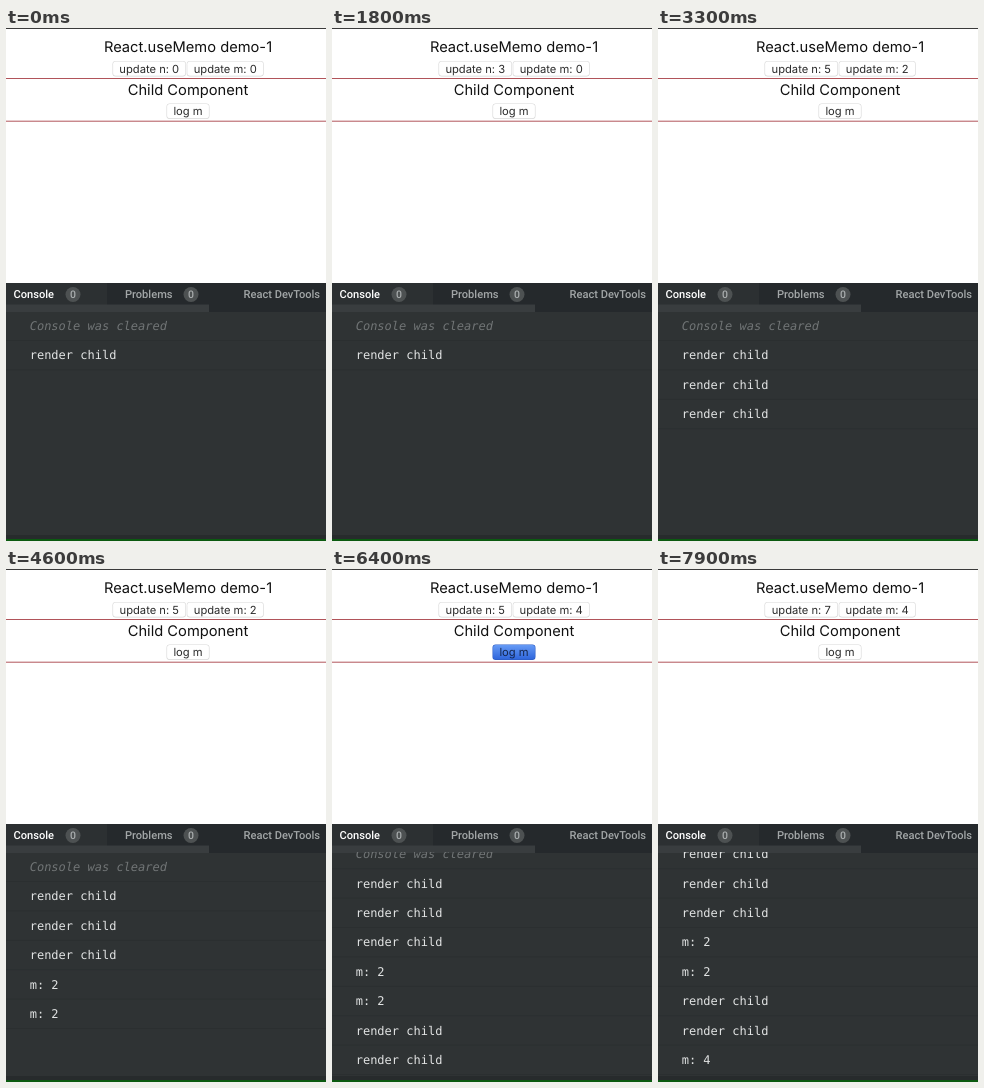
Write an HTML page that moves like this. It is 320 by 513 pixels and loops after 8000 ms.

```html
<!DOCTYPE html>
<html lang="en">
<head>
<meta charset="utf-8">
<title>useMemo demo</title>
<style>
  html, body { margin: 0; width: 100%; height: 100%; overflow: hidden; background: #fff; }
  svg { display: block; width: 320px; height: 513px; text-rendering: geometricPrecision; }
  .title { font: 14.7px Inter, sans-serif; fill: #111; text-anchor: middle; }
  .button text { font: 11.2px Inter, sans-serif; fill: #2c2c2c; text-anchor: middle; }
  .button .edge { fill: #d8d8d8; }
  .button .face { fill: #fff; }
  .button.down .edge { fill: #2c5cc4; }
  .button.down .face { fill: url(#blue); }
  .button.down text { fill: #14264f; }
  .tab { font: 500 11.1px Roboto, sans-serif; fill: #a3a7a8; }
  .tab.on { fill: #fff; }
  .badge { fill: #4d5152; }
  .count { font: 500 10.5px Roboto, sans-serif; fill: #a9adae; text-anchor: middle; }
  .row text { font: 12px "DejaVu Sans Mono", monospace; fill: #e2e4e4; white-space: pre; }
  .row.note text { font-style: italic; fill: #717576; }
  .row line { stroke: #2b2f30; }
</style>
</head>
<body>
<svg viewBox="0 0 320 513">
  <defs>
    <linearGradient id="blue" x2="0" y2="1">
      <stop offset="0" stop-color="#659af5"/>
      <stop offset="1" stop-color="#2f66dc"/>
    </linearGradient>
    <clipPath id="view"><rect y="283" width="320" height="224"/></clipPath>
  </defs>

  <rect width="320" height="513" fill="#fff"/>
  <rect width="320" height="1" fill="#3a3a3a"/>
  <text class="title" x="182" y="24">React.useMemo demo-1</text>
  <text class="title" x="182" y="66.7">Child Component</text>
  <path d="M0 50.5H320M0 93.2H320" stroke="#b1545a"/>
  <g id="buttons"></g>

  <rect y="255" width="320" height="258" fill="#2f3334"/>
  <rect y="255" width="320" height="29" fill="#25292c"/>
  <rect y="255" width="101" height="22" fill="#2c3032"/>
  <rect y="276.5" width="203" height="7.5" fill="#393d3f"/>
  <text class="tab on" x="7.5" y="270">Console</text>
  <text class="tab" x="119" y="270">Problems</text>
  <text class="tab" x="237.5" y="270">React DevTools</text>
  <circle class="badge" cx="67" cy="266.5" r="7.5"/>
  <circle class="badge" cx="185" cy="266.5" r="7.5"/>
  <text class="count" x="67" y="270">0</text>
  <text class="count" x="185" y="270">0</text>

  <g clip-path="url(#view)"><g id="rows"></g></g>
  <rect y="507" width="320" height="4" fill="#272b2c"/>
  <rect y="511" width="320" height="2" fill="#0b5a10"/>
</svg>
<script>
  const LOOP = 8000, HOLD = 200, DELAY = 100;
  const ROW = 29.4, FIRST = 302, ROOM = 193;

  // Button presses: time in ms and the button hit.
  const clicks = [
    [400, "n"], [1000, "n"], [1500, "n"], [1900, "n"], [2200, "n"],
    [2500, "m"], [3000, "m"],
    [3600, "log"], [4300, "log"],
    [5400, "m"], [5950, "m"],
    [6350, "log"],
    [6900, "n"], [7650, "n"]
  ];

  const add = (parent, tag, attrs = {}) => {
    const el = document.createElementNS("http://www.w3.org/2000/svg", tag);
    for (const key in attrs) el.setAttribute(key, attrs[key]);
    return parent.appendChild(el);
  };

  const addButton = (x, y, width) => {
    const g = add(document.getElementById("buttons"), "g", { class: "button" });
    add(g, "rect", { class: "edge", x, y, width, height: 15.5, rx: 3.2 });
    add(g, "rect", { class: "face", x: x + .6, y: y + .5, width: width - 1.2, height: 14.3, rx: 2.7 });
    return { g, label: add(g, "text", { x: x + width / 2, y: y + 11.8 }) };
  };

  const buttons = {
    n: addButton(106.5, 33, 73.5),
    m: addButton(180.7, 33, 77),
    log: addButton(160.5, 75.5, 43)
  };

  const rowBox = document.getElementById("rows");
  const rows = [];
  const addRow = (text, note) => {
    const y = FIRST + rows.length * ROW;
    const g = add(rowBox, "g", { class: note ? "row note" : "row" });
    add(g, "text", { x: 23.7, y }).textContent = text;
    add(g, "line", { x2: 320, y1: y + 10.5, y2: y + 10.5 });
    rows.push(g);
  };

  addRow("Console was cleared", true);
  addRow("render child");
  let logged = 0;
  for (const [, name] of clicks) {
    if (name === "m") { logged++; addRow("render child"); }
    if (name === "log") addRow("m: " + logged);
  }

  const draw = time => {
    const count = { n: 0, m: 0, log: 0 };
    let down = "";
    for (const [start, name] of clicks) {
      if (time >= start + DELAY) count[name]++;
      if (time >= start && time < start + HOLD) down = name;
    }
    buttons.n.label.textContent = "update n: " + count.n;
    buttons.m.label.textContent = "update m: " + count.m;
    buttons.log.label.textContent = "log m";
    for (const name in buttons) buttons[name].g.classList.toggle("down", name === down);

    const shown = 2 + count.m + count.log;
    rows.forEach((row, i) => row.setAttribute("visibility", i < shown ? "visible" : "hidden"));
    const scroll = Math.max(0, (shown - 1) * ROW - ROOM);
    rowBox.setAttribute("transform", `translate(0 ${-scroll})`);
  };

  const start = performance.now();
  const tick = () => {
    draw((performance.now() - start) % LOOP);
    requestAnimationFrame(tick);
  };
  tick();
</script>
</body>
</html>
```
